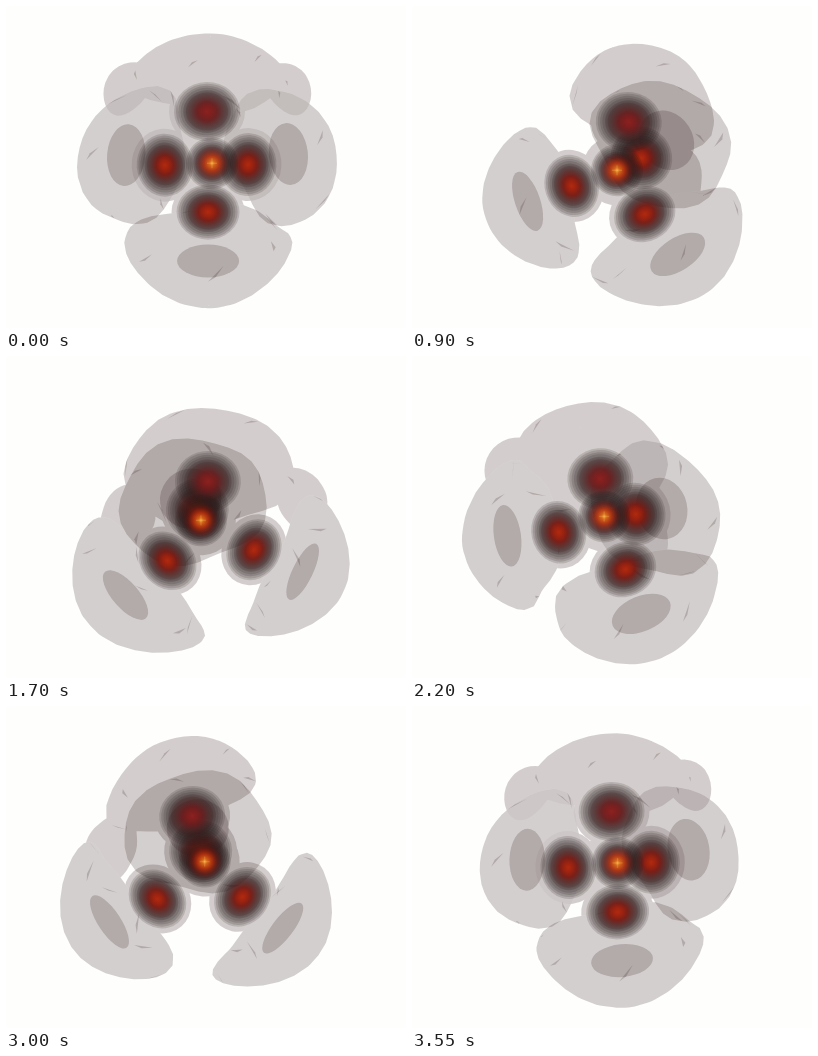
Recreate the animation shown at these times as an HTML page with a canvas. Size 400 px wide and 322 px high, loop 3.6 s.

```html
<!DOCTYPE html>
<html lang="en">
<head>
<meta charset="utf-8">
<title>Rotating density surfaces</title>
<style>
  html, body { margin: 0; width: 100%; height: 100%; overflow: hidden; background: #fefefd; }
  canvas { display: block; width: 400px; height: 322px; }
</style>
</head>
<body>
<canvas id="view" width="400" height="322"></canvas>
<script>
const W = 400, H = 322, LOOP = 3600, STEP = 50;
const SIN = 0.64, COS = 0.768, DIST = 850;
const SHADE = 'rgb(46,22,20)';
const ctx = document.getElementById('view').getContext('2d');
const layer = document.createElement('canvas');
layer.width = W;
layer.height = H;
const lx = layer.getContext('2d');

// Vectors are [right, up, away]
const ORIGIN = [2, 0, 10];
const unit = v => { const m = Math.hypot(...v); return v.map(c => c / m); };
const cross = (a, b) => [a[1] * b[2] - a[2] * b[1], a[2] * b[0] - a[0] * b[2], a[0] * b[1] - a[1] * b[0]];
const outward = p => unit(p.map((c, i) => c - ORIGIN[i]));
const clamp = v => Math.max(0, Math.min(1, v));

let ca = 1, sa = 0;
const turn = ([x, y, z]) => [x * ca + z * sa, y, z * ca - x * sa];
function project(p) {
  const [x, y, z] = turn(p);
  const s = DIST / (DIST + z * COS - y * SIN);
  return [200 + x * s, 162 - (y * COS + z * SIN) * s];
}

// A flattened, inward-curling shell piece as a grid of points
function makeMesh(c, n, [a, b, t], bend, seed) {
  const rows = 16, cols = 32, grid = [];
  const u = unit(cross(n, [0, 1, 0])), v = cross(u, n);
  for (let i = 0; i <= rows; i++) {
    const th = Math.PI * i / rows, row = [];
    for (let j = 0; j <= cols; j++) {
      const ph = 2 * Math.PI * j / cols;
      const k = Math.sin(th) * (1 + 0.035 * Math.sin(3 * ph + seed) + 0.03 * Math.sin(5 * ph + 2 * seed));
      const p = k * Math.cos(ph), q = k * Math.sin(ph);
      const w = t * Math.cos(th) - bend * (p * p + q * q) + bend * 0.35;
      row.push(c.map((o, d) => o + a * p * u[d] + b * q * v[d] + w * n[d]));
    }
    grid.push(row);
  }
  return grid;
}

// Faces turned one way share a winding, so a nonzero fill gives the silhouette
function meshPath(grids) {
  const path = new Path2D();
  for (const grid of grids) {
    const pts = grid.map(r => r.map(project));
    for (let i = 0; i + 1 < pts.length; i++) {
      for (let j = 0; j + 1 < pts[i].length; j++) {
        const [a, b, c, d] = [pts[i][j], pts[i][j + 1], pts[i + 1][j + 1], pts[i + 1][j]];
        const area = (c[0] - a[0]) * (d[1] - b[1]) - (d[0] - b[0]) * (c[1] - a[1]);
        if (area <= 0) continue;
        path.moveTo(...a);
        path.lineTo(...b);
        path.lineTo(...c);
        path.lineTo(...d);
        path.closePath();
      }
    }
  }
  return path;
}

const lobes = [[-86, -32, 60], [89, -32, 62], [2, -43, -87]].map((c, i) => {
  const n = outward(c);
  return { c, n, grid: makeMesh(c, n, [81, 70, 34], 29, i * 1.7 + 0.6) };
});
const capAt = [3, 98, 33];
const cap = [
  makeMesh(capAt, outward(capAt), [77, 67, 23], 20, 2.3),
  ...[-79, 82].map(x => makeMesh([x, 58, 56], outward([x, 58, 56]), [25, 33, 21], 4, x))
];

const HOT = [[0, '240,165,62'], [0.14, '218,104,26'], [0.4, '184,48,12'], [0.68, '118,20,12']];
const WARM = [[0, '176,42,14'], [0.2, '160,32,12'], [0.42, '126,22,14'], [0.66, '92,22,18']];
const DIM = [[0, '138,34,32'], [0.2, '128,28,28'], [0.42, '108,26,26'], [0.66, '88,28,28']];
const atoms = [
  { p: [1, 58, 16], wide: 33, deep: 28, tint: DIM },
  { p: [-43, -22, 31], wide: 31.5, deep: 26.5, tint: WARM },
  { p: [44, -22, 32], wide: 31.5, deep: 26.5, tint: WARM },
  { p: [2, -22, -41], wide: 31.5, deep: 26.5, tint: WARM },
  { p: [6, 2, 5], wide: 26, deep: 26, tint: HOT }
];
for (const a of atoms) a.n = outward(a.p);

// Enter the unit disc that a spheroid projects to
function inDisc(g, p, n, wide, deep, draw) {
  const [x, y] = project(p), [nx, ny, nz] = turn(n);
  const vx = nx, vy = -(ny * COS + nz * SIN), m = vx * vx + vy * vy;
  g.save();
  g.translate(x, y);
  g.rotate(Math.atan2(vy, vx));
  g.scale(Math.sqrt(wide * wide * (1 - m) + deep * deep * m), wide);
  draw(g);
  g.restore();
}
function disc(g, r) {
  g.beginPath();
  g.arc(0, 0, r, 0, 2 * Math.PI);
  g.fill();
}

function drawAtom(a) {
  inDisc(ctx, a.p, a.n, a.wide, a.deep, g => {
    g.fillStyle = 'rgba(42,30,30,0.16)';
    for (const r of [1, 0.94, 0.87, 0.8, 0.72, 0.64]) disc(g, r);
    const glow = g.createRadialGradient(0, 0, 0, 0, 0, 0.74);
    a.tint.forEach(([at, rgb], i) => glow.addColorStop(at, `rgba(${rgb},${[1, 0.95, 0.85, 0.5][i]})`));
    glow.addColorStop(1, 'rgba(60,26,24,0)');
    g.fillStyle = glow;
    disc(g, 0.74);
  });
  if (a.tint === HOT) {
    const [x, y] = project(a.p);
    ctx.fillStyle = 'rgba(250,190,90,0.25)';
    ctx.fillRect(x - 5, y - 0.7, 10, 1.4);
    ctx.fillRect(x - 0.7, y - 5, 1.4, 10);
  }
}

// Short dark folds near the rim of a piece
function drawCreases(grid, seed) {
  ctx.fillStyle = SHADE;
  ctx.globalAlpha = 0.2;
  for (let i = 0; i < 6; i++) {
    const j = (i * 5 + seed * 3) % 31, r = 6 + (i * 3 + seed) % 4;
    const [a, b, c] = [grid[r][j], grid[r + 2][j + 1], grid[r + 1][j + 1]].map(project);
    ctx.beginPath();
    ctx.moveTo(...a);
    ctx.lineTo(...b);
    ctx.lineTo((a[0] + c[0]) / 2, (a[1] + c[1]) / 2);
    ctx.fill();
  }
}

function draw(time) {
  const angle = 2 * Math.PI * time / LOOP;
  ca = Math.cos(angle);
  sa = Math.sin(angle);
  ctx.globalAlpha = 1;
  ctx.fillStyle = '#fefefd';
  ctx.fillRect(0, 0, W, H);

  // The cap and atom necks only darken the lobes that lie behind them
  lx.globalCompositeOperation = 'source-over';
  lx.globalAlpha = 1;
  lx.clearRect(0, 0, W, H);
  lx.fillStyle = SHADE;
  lx.fill(meshPath(cap));
  for (const a of atoms) {
    const neck = a.tint === HOT ? 9 : 5;
    inDisc(lx, a.p, a.n, a.wide + neck, a.deep + neck, g => disc(g, 1));
  }
  lx.globalCompositeOperation = 'destination-out';

  ctx.fillStyle = SHADE;
  ctx.globalAlpha = 0.2;
  for (const lobe of lobes) {
    const path = meshPath([lobe.grid]);
    ctx.fill(path);
    lx.globalAlpha = 1 - clamp((turn(lobe.c)[2] - 45) / 35);
    lx.fill(path);
  }
  ctx.drawImage(layer, 0, 0);
  for (const lobe of lobes) inDisc(ctx, lobe.c, lobe.n, 31, 10, g => disc(g, 1));
  lobes.forEach((lobe, i) => drawCreases(lobe.grid, i + 1));
  drawCreases(cap[0], 5);

  ctx.globalAlpha = 1;
  const depth = a => turn(a.p)[2] * COS - a.p[1] * SIN;
  const order = atoms.slice(0, 4).sort((a, b) => depth(b) - depth(a));
  for (const a of [...order, atoms[4]]) drawAtom(a);
}

function frame() {
  draw(Math.floor(performance.now() % LOOP / STEP) * STEP);
  requestAnimationFrame(frame);
}
frame();
</script>
</body>
</html>
```
